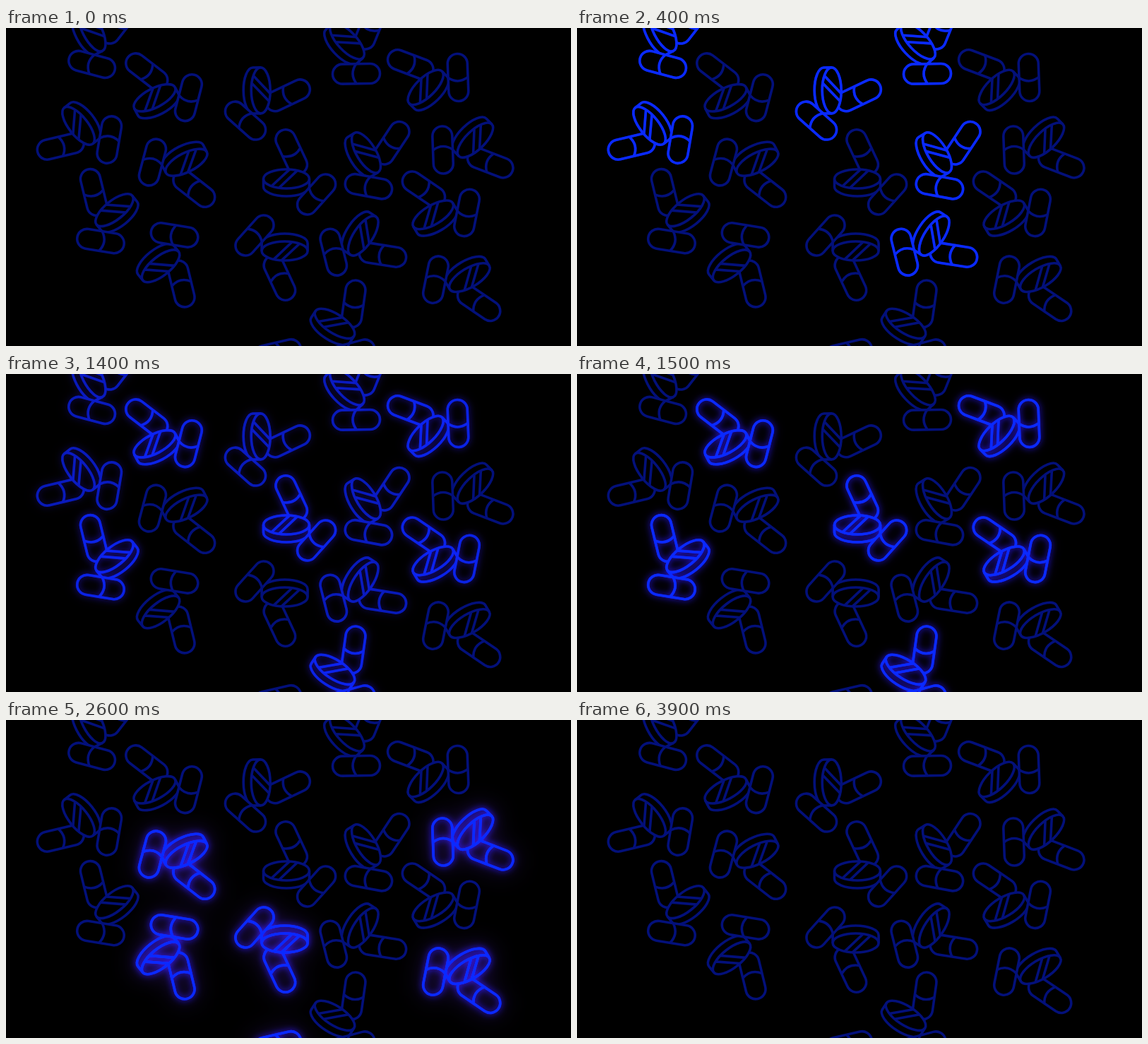
An HTML page with a canvas that plays this animation: 800 by 450 pixels, repeating every 4700 ms.

```html
<!DOCTYPE html>
<html lang="en">
<head>
<meta charset="utf-8">
<title>Neon pills</title>
<style>
html, body { margin: 0; width: 100%; height: 100%; overflow: hidden; background: #000; }
canvas { display: block; }
</style>
</head>
<body>
<canvas id="stage" width="800" height="450"></canvas>
<script>
const W = 800, H = 450, PAD = 60, LOOP = 4700, STEP = 100;
const DIM = '#03107a', LIT = '#0a2aff';
const stage = document.getElementById('stage').getContext('2d');

// Each cluster: x, y, rotation in degrees, mirrored
const groups = [
  {
    clusters: [
      [117, 6, 63], [479, 22.4, 47], [106.9, 135, -128.4, true],
      [355.2, 88.4, 89.6], [505.3, 179.3, 58.6], [501.2, 291, 123.9]
    ],
    line: [0, 300], glow: [400, 900], off: [1200, 1500], wide: 0
  },
  {
    clusters: [
      [213, 103.7, -27.5], [598, 87.9, -44.3], [397, 219, 0],
      [156.9, 262, -38.7, true], [607.5, 269.1, -30.8], [462.5, 422.9, 33]
    ],
    line: [1200, 1500], glow: [1200, 1500], off: [2400, 2600], wide: 0
  },
  {
    clusters: [
      [252.9, 185.3, 152.9], [660.6, 154.7, 135.9], [215.6, 332.5, 141.3, true],
      [394.6, 310, 180], [653.5, 348.4, 149.2], [410, 497, 215]
    ],
    line: [2400, 2600], glow: [2400, 2600], off: [3600, 3900], wide: 1
  }
];

function layer() {
  const c = document.createElement('canvas');
  c.width = W + 2 * PAD;
  c.height = H + 2 * PAD;
  return c.getContext('2d');
}

// Clears what lies behind a shape, then outlines it
function outline(c, path) {
  c.globalCompositeOperation = 'destination-out';
  c.fill(path);
  c.globalCompositeOperation = 'source-over';
  c.stroke(path);
}

function capsule(c, x, y, deg) {
  const body = new Path2D(), r = 14, half = 19.5;
  body.arc(-half, 0, r, Math.PI / 2, Math.PI * 1.5);
  body.arc(half, 0, r, -Math.PI / 2, Math.PI / 2);
  body.closePath();
  const seam = new Path2D();
  seam.moveTo(0, -r);
  seam.quadraticCurveTo(10, 0, 0, r);
  c.save();
  c.translate(x, y);
  c.rotate(deg * Math.PI / 180);
  outline(c, body);
  c.stroke(seam);
  c.restore();
}

function tablet(c) {
  const rx = 32.5, ry = 13.5, d = 5.5;
  const body = new Path2D();
  body.ellipse(0, -d, rx, ry, 0, Math.PI, 2 * Math.PI);
  body.ellipse(0, d, rx, ry, 0, 0, Math.PI);
  body.closePath();
  outline(c, body);
  const face = new Path2D();
  face.ellipse(0, -d, rx, ry, 0, 0, Math.PI);
  face.moveTo(-21, 4.8);
  face.lineTo(4.5, -18.9);
  face.moveTo(-10.5, 7.3);
  face.lineTo(15.5, -17.4);
  c.stroke(face);
}

function drawCluster(c, [x, y, deg, mirrored]) {
  c.save();
  c.translate(x + PAD, y + PAD);
  c.rotate(deg * Math.PI / 180);
  if (mirrored) c.scale(-1, 1);
  capsule(c, 7.2, -43.5, 65);
  tablet(c);
  capsule(c, 42.6, 16.5, 132);
  c.restore();
}

function drawLines(clusters, color) {
  const c = layer();
  c.strokeStyle = color;
  c.lineWidth = 3.6;
  c.lineJoin = 'round';
  clusters.forEach(k => drawCluster(c, k));
  return c.canvas;
}

function makeGlow(group) {
  const c = layer();
  c.globalCompositeOperation = 'lighter';
  const add = (color, blur, alpha) => {
    c.filter = `blur(${blur}px)`;
    c.globalAlpha = alpha;
    c.drawImage(drawLines(group.clusters, color), 0, 0);
  };
  add('#2814ff', 4.5, 0.85);
  add('#3a18e0', 8, 0.35);
  if (group.wide) add('#5a28d0', 17, 0.75);
  return c.canvas;
}

const base = drawLines(groups.flatMap(g => g.clusters), DIM);
for (const g of groups) {
  g.litLayer = drawLines(g.clusters, LIT);
  g.glowLayer = makeGlow(g);
}

const ramp = (t, [a, b]) => Math.min(1, Math.max(0, (t - a) / (b - a)));

function put(image, alpha, mode) {
  if (alpha <= 0) return;
  stage.globalAlpha = alpha;
  stage.globalCompositeOperation = mode;
  stage.drawImage(image, -PAD, -PAD);
}

function render(t) {
  stage.globalAlpha = 1;
  stage.globalCompositeOperation = 'source-over';
  stage.fillStyle = '#000';
  stage.fillRect(0, 0, W, H);
  put(base, 1, 'source-over');
  for (const g of groups) {
    const on = 1 - ramp(t, g.off);
    put(g.glowLayer, on * ramp(t, g.glow), 'lighter');
    put(g.litLayer, on * ramp(t, g.line), 'source-over');
  }
}

const start = performance.now();
function tick() {
  const t = (performance.now() - start) % LOOP;
  render(Math.floor(t / STEP) * STEP);
  requestAnimationFrame(tick);
}
tick();
</script>
</body>
</html>
```
